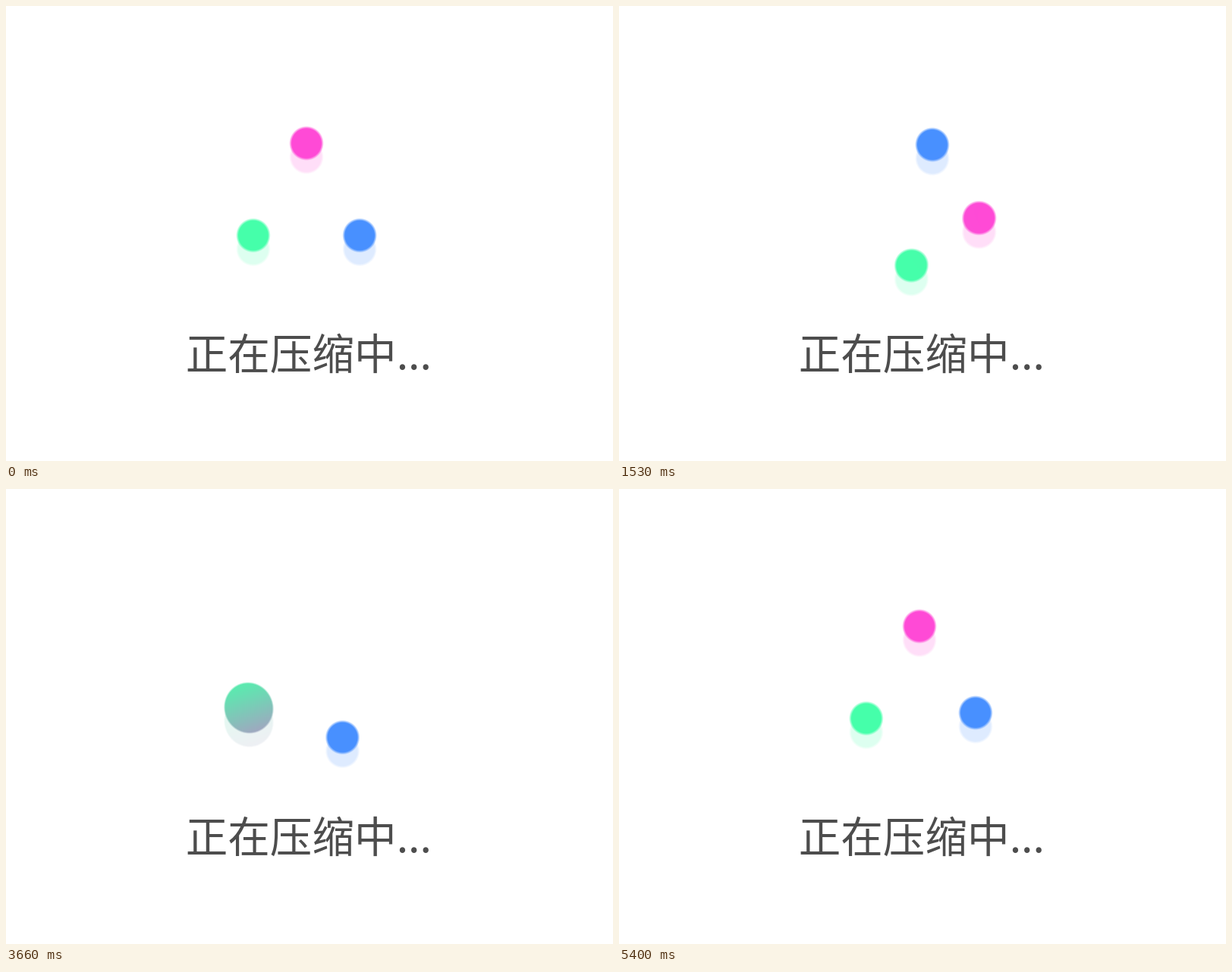
An HTML page with a canvas for the animation above (5430 ms loop, 800 by 600 pixels).

```html
<!DOCTYPE html>
<html lang="zh-CN">
<head>
<meta charset="utf-8">
<title>正在压缩中</title>
<style>
  html, body { margin: 0; width: 100%; height: 100%; overflow: hidden; background: #fff; }
  canvas { position: absolute; left: 0; top: 0; }
  p {
    position: absolute; left: 236.7px; top: 420px; margin: 0;
    white-space: nowrap;
  }
  svg { position: absolute; left: 0; top: 0; }
  text {
    font: 500 55.6px "Noto Sans CJK SC", "Noto Sans CJK", "Noto Sans CJK JP", sans-serif;
    fill: #4d4d4d;
  }
</style>
</head>
<body>
<canvas id="stage" width="800" height="600"></canvas>
<svg width="800" height="600"><text x="236.7" y="479">正在压缩中...</text></svg>
<script>
const LOOP = 5430, STEP = 30;
const RING = { x: 396, y: 262, r: 81 };
const DISC = 22.5;       // radius of each disc before it is blurred
const SPREAD = 1840;     // twice the variance of the blurred disc
const SHADOW = { dy: 18, alpha: 0.18 };
const BOX = { x: 266, y: 132, size: 260 };

const turn = (t, end, count) => 360 * count * Math.min(1, t / end);

// Bottom to top; angles run clockwise from twelve o'clock.
const balls = [
  { color: [255, 74, 214], angle: t => turn(t, 5370, 1) },
  { color: [69, 255, 170], angle: t => 240 + turn(t, 5370, 3) },
  { color: [72, 144, 255], angle: t => 120 + (t < 4500 ? 0.4 * t : turn(t - 4500, 915, 1)) }
];

const bell = d => Math.exp(-d * d / SPREAD);
const FAINT = bell(22.8), SOLID = bell(19.3);

const stage = document.getElementById('stage').getContext('2d');
const blob = document.createElement('canvas');
blob.width = blob.height = BOX.size;
const blobCtx = blob.getContext('2d');
const image = blobCtx.createImageData(BOX.size, BOX.size);

function place(ball, t) {
  const a = ball.angle(t) * Math.PI / 180;
  return { x: RING.x + RING.r * Math.sin(a), y: RING.y - RING.r * Math.cos(a) };
}

// Share of a disc that another disc at distance d covers.
function overlap(d) {
  const q = Math.min(1, d / (2 * DISC));
  return 2 / Math.PI * (Math.acos(q) - q * Math.sqrt(1 - q * q));
}

// The blur is separable, so each bump needs only one row and one column.
function bump(x, y, mass, owner) {
  const cols = new Float64Array(BOX.size), rows = new Float64Array(BOX.size);
  for (let i = 0; i < BOX.size; i++) {
    cols[i] = bell(BOX.x + i + 0.5 - x);
    rows[i] = bell(BOX.y + i + 0.5 - y) * mass;
  }
  return { cols, rows, owner };
}

function bumpsAt(t) {
  const spots = balls.map(b => place(b, t));
  const bumps = spots.map((s, i) => bump(s.x, s.y, 1, i));
  for (let low = 0; low < 2; low++) {
    for (let top = low + 1; top < 3; top++) {
      const a = spots[low], b = spots[top];
      const hidden = overlap(Math.hypot(a.x - b.x, a.y - b.y));
      if (hidden > 0) bumps.push(bump((a.x + b.x) / 2, (a.y + b.y) / 2, -hidden, low));
    }
  }
  return bumps;
}

function paintBlob(t) {
  const bumps = bumpsAt(t), px = image.data, w = [0, 0, 0];
  for (let y = 0, k = 0; y < BOX.size; y++) {
    for (let x = 0; x < BOX.size; x++, k += 4) {
      w[0] = w[1] = w[2] = 0;
      for (const b of bumps) w[b.owner] += b.cols[x] * b.rows[y];
      for (let i = 0; i < 3; i++) if (w[i] < 0) w[i] = 0;
      const sum = w[0] + w[1] + w[2];
      if (sum <= FAINT) { px[k + 3] = 0; continue; }
      for (let c = 0; c < 3; c++) {
        px[k + c] = (w[0] * balls[0].color[c] + w[1] * balls[1].color[c] + w[2] * balls[2].color[c]) / sum;
      }
      px[k + 3] = 255 * Math.min(1, (sum - FAINT) / (SOLID - FAINT));
    }
  }
  blobCtx.putImageData(image, 0, 0);
}

function draw(t) {
  paintBlob(t);
  stage.clearRect(0, 0, 800, 600);
  stage.globalAlpha = SHADOW.alpha;
  stage.drawImage(blob, BOX.x, BOX.y + SHADOW.dy);
  stage.globalAlpha = 1;
  stage.drawImage(blob, BOX.x, BOX.y);
}

const start = performance.now();
let shown = -1;
function tick() {
  const now = Math.max(0, performance.now() - start) % LOOP;
  const t = Math.floor(now / STEP) * STEP;
  if (t !== shown) draw(shown = t);
  requestAnimationFrame(tick);
}
tick();
</script>
</body>
</html>
```
